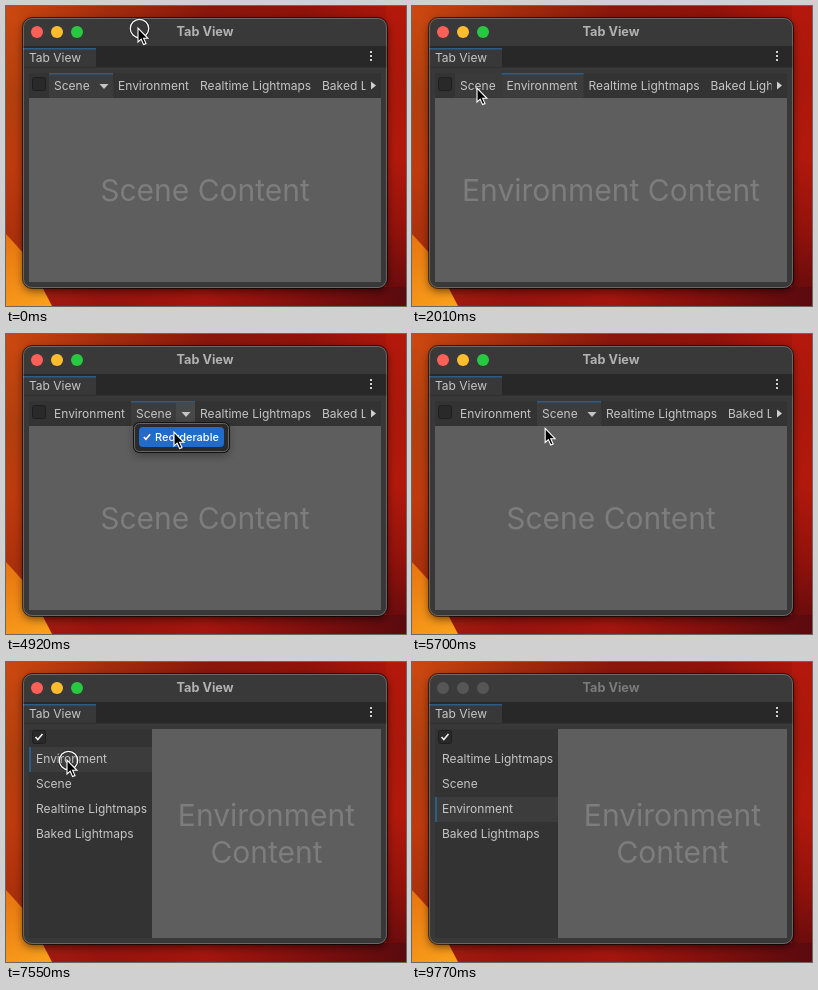
Animation, 400 px wide and 300 px high, one loop 9.79 s. Source, as an HTML page with a canvas:

```html
<!DOCTYPE html>
<html lang="en">
<head>
<meta charset="utf-8">
<title>Tab View</title>
<style>
html, body { margin: 0; width: 100%; height: 100%; overflow: hidden; background: #8b150b; }
canvas { display: block; width: 400px; height: 300px; }
</style>
</head>
<body>
<canvas id="stage" width="400" height="300"></canvas>
<script>
const g = document.getElementById('stage').getContext('2d');
const LOOP = 9790, STEP = 87.7;
const FONT = 'Inter, Roboto, sans-serif';
const BLUE = '#2c5d87', TEXT = '#c6c6c6', PANEL = '#333333', ACTIVE = '#3c3c3c';

const tabs = {
  S: { label: 'Scene', w: 46.5 },
  E: { label: 'Environment', w: 82 },
  R: { label: 'Realtime Lightmaps', w: 122 },
  B: { label: 'Baked Lightmaps', w: 106 }
};

// Pointer path: time, x, y
const path = [
  [350, 132, 22], [1050, 120, 81], [1570, 120, 81], [1830, 65, 82],
  [2900, 65, 82], [3245, 114, 83], [3420, 131, 83],
  [3770, 131, 83], [4210, 180, 79], [4740, 180, 79], [4910, 168, 98], [5000, 168, 100],
  [5440, 168, 100], [6210, 37, 79], [6670, 37, 79], [7105, 61, 98],
  [7550, 61, 98], [8240, 62, 150], [8870, 62, 150], [9370, 372, 304]
];

// Times during which the mouse button is held
const presses = [
  [0, 80], [1130, 1310], [2100, 2270], [2810, 3680], [4380, 4560],
  [5180, 5350], [6220, 6400], [7200, 7370], [7550, 8510]
];

const within = (t, a, b) => t >= a && t < b;

function pointerAt(ms) {
  const t = Math.floor((ms + 16) / STEP) * STEP;
  const i = path.findIndex(p => p[0] > t);
  if (i < 1) return path[i ? path.length - 1 : 0].slice(1);
  const [t0, x0, y0] = path[i - 1], [t1, x1, y1] = path[i];
  const u = (t - t0) / (t1 - t0), e = u * u * (3 - 2 * u);
  return [x0 + (x1 - x0) * e, y0 + (y1 - y0) * e];
}

function rect(x, y, w, h, color) {
  g.fillStyle = color;
  g.fillRect(x, y, w, h);
}

function round(x, y, w, h, r, fill, stroke) {
  g.beginPath();
  g.roundRect(x, y, w, h, r);
  if (fill) { g.fillStyle = fill; g.fill(); }
  if (stroke) { g.strokeStyle = stroke; g.lineWidth = 1; g.stroke(); }
}

function text(s, x, y, color = TEXT, size = 12, weight = 400, align = 'left') {
  g.font = `${weight} ${size}px ${FONT}`;
  g.textAlign = align;
  g.fillStyle = color;
  g.fillText(s, x, y);
}

function poly(color, ...pts) {
  g.beginPath();
  for (let i = 0; i < pts.length; i += 2) g.lineTo(pts[i], pts[i + 1]);
  g.closePath();
  g.fillStyle = color;
  g.fill();
}

function dot(x, y, r, color) {
  g.beginPath();
  g.arc(x, y, r, 0, 7);
  g.fillStyle = color;
  g.fill();
}

function tick(x, y, s, color) {
  g.beginPath();
  g.moveTo(x - 3.5 * s, y);
  g.lineTo(x - 1.2 * s, y + 2.6 * s);
  g.lineTo(x + 3.5 * s, y - 3 * s);
  g.strokeStyle = color;
  g.lineWidth = 1.6;
  g.stroke();
}

function gradient(x0, y0, x1, y1, ...colors) {
  const f = g.createLinearGradient(x0, y0, x1, y1);
  colors.forEach((c, i) => f.addColorStop(i / (colors.length - 1), c));
  return f;
}

function wallpaper() {
  rect(0, 0, 400, 300, gradient(0, 0, 400, 0, '#cc480f', '#a42c0d', '#8a170b', '#8f120a', '#b0170b'));
  rect(0, 12, 17, 288, gradient(0, 12, 0, 240, '#c8470f', '#b23f0e', '#bd3a0d', '#a92f0d'));
  rect(380, 0, 20, 300, gradient(0, 0, 0, 300, '#b3180b', '#ab180b', '#b2190c', '#92120b', '#5f0a0d'));
  rect(0, 281, 400, 19, gradient(0, 0, 400, 0, '#a8200e', '#96130e', '#a3150d', '#800f0d', '#5a0a0e'));
  poly(gradient(0, 230, 40, 300, '#e8740f', '#f9a01c'), 0, 228, 20, 250, 46, 300, 0, 300);
}

function windowFrame(focused) {
  g.save();
  g.shadowColor = 'rgba(0,0,0,.55)';
  g.shadowBlur = 9;
  g.shadowOffsetY = 3;
  round(17, 12, 364, 270, 9, '#383838');
  g.restore();
  g.save();
  round(17, 12, 364, 270, 9);
  g.clip();
  rect(17, 12, 364, 28, focused ? '#393939' : '#3b3b3b');
  rect(17, 40, 364, 22, '#282828');
  rect(17, 42, 73, 20, '#383838');
  rect(17, 42, 73, 1.5, BLUE);
  rect(17, 62, 364, 220, '#383838');
  rect(17, 61, 364, 1, '#303030');
  g.restore();
  round(16.5, 11.5, 365, 271, 9.5, null, 'rgba(0,0,0,.6)');
  round(17.5, 12.5, 363, 269, 8.5, null, 'rgba(255,255,255,.24)');
  ['#ff5f57', '#febc2e', '#28c840'].forEach((c, i) => dot(31 + 20 * i, 26, 6, focused ? c : '#565656'));
  text('Tab View', 199, 30, focused ? '#b2b2b2' : '#7b7b7b', 12.7, 700, 'center');
  text('Tab View', 23, 56);
  [46, 50, 54].forEach(y => rect(364, y - 1, 2, 2, '#d0d0d0'));
  rect(23, 67, 352, 209, PANEL);
}

function checkbox(y, checked) {
  round(26.5, y + .5, 13, 13, 2, '#292929', '#1e1e1e');
  if (checked) tick(33, y + 7, 1, '#eeeeee');
}

function dropArrow(x, y) {
  poly('#c4c4c4', x - 4.5, y - 2, x + 4.5, y - 2, x, y + 3);
}

function drawScene(ms) {
  const [cx, cy] = pointerAt(ms);
  const order = ms < 3420 ? 'SERB' : ms < 8340 ? 'ESRB' : 'RSEB';
  const active = within(ms, 1220, 2180) || ms >= 7290 ? 'E' : 'S';
  const vertical = ms >= 6310;
  const menuOpen = within(ms, 4470, 5350);
  const dragging = within(ms, 2900, 3590) || within(ms, 7550, 8510);
  const focused = ms < 9770;

  wallpaper();
  windowFrame(focused);
  checkbox(vertical ? 68 : 71, vertical);

  const drawTab = (id, x, y, w, h) => {
    const on = id === active;
    const over = !menuOpen && !dragging && focused && cx >= x && cx < x + w && cy >= y && cy < y + h;
    if (on || over) rect(x, y, w, h, on ? ACTIVE : '#3a3a3a');
    if (on) rect(x, y, vertical ? 2 : w, vertical ? h : 1.5, BLUE);
    text(tabs[id].label, x + (vertical ? 7 : 5), y + (vertical ? 16 : 17));
    if (id === 'S' && on) {
      const ax = vertical ? 137 : x + 55;
      if (!vertical && (menuOpen || over && cx > x + 45)) rect(x + 45, y + 1.5, w - 45, h - 1.5, '#484848');
      dropArrow(ax, y + (vertical ? 12 : 13));
    }
  };

  g.save();
  g.beginPath();
  if (vertical) g.rect(23, 85, 123, 191);
  else g.rect(43, 67, 316.5, 25);
  g.clip();
  let pos = vertical ? 85 : 43, dragged;
  for (const id of order) {
    const w = vertical ? 123 : id === 'S' && active === 'S' ? 64 : tabs[id].w;
    if (dragging && id === active) dragged = w;
    else if (vertical) drawTab(id, 23, pos, w, 25);
    else drawTab(id, pos, 67, w, 25);
    pos += vertical ? 25 : w;
  }
  if (dragged) {
    if (vertical) drawTab(active, 23, 85 + Math.max(0, cy - 98), dragged, 25);
    else drawTab(active, 43 + Math.max(0, cx - 70), 67, dragged, 25);
  }
  g.restore();

  const name = tabs[active].label, faint = '#7d7d7d';
  if (vertical) {
    rect(146, 67, 229, 209, '#5e5e5e');
    text(name, 260.5, 164, faint, 30, 400, 'center');
    text('Content', 260.5, 200.5, faint, 30, 400, 'center');
  } else {
    rect(23, 92, 352, 184, '#5e5e5e');
    text(name + ' Content', 199, 195, faint, 30, 400, 'center');
    poly('#d0d0d0', 365, 75.5, 370, 79.5, 365, 83.5);
  }

  if (menuOpen) menu(cy > 93 && !within(ms, 5260, 5350));
  if (presses.some(([a, b]) => within(ms, a, b))) clickRing(cx + 1.5, cy + .5);
  if (focused) arrow(cx, cy);
}

function menu(lit) {
  g.save();
  g.shadowColor = 'rgba(0,0,0,.3)';
  g.shadowBlur = 8;
  g.shadowOffsetY = 3;
  round(127.5, 88, 96, 31, 6, '#2a2a2a');
  g.restore();
  round(127.5, 88.5, 96, 30, 6, null, '#141414');
  round(128.5, 89.5, 94, 28, 5, null, '#666666');
  if (lit) round(133, 93, 85, 20, 4, '#216bcb');
  tick(141, 103, .9, '#ffffff');
  text('Reorderable', 149, 107, '#ffffff', 11, 500);
}

function clickRing(x, y) {
  g.beginPath();
  g.arc(x, y, 9.2, 0, 7);
  g.strokeStyle = 'rgba(0,0,0,.45)';
  g.lineWidth = 2.6;
  g.stroke();
  g.strokeStyle = '#ffffff';
  g.lineWidth = 1.3;
  g.stroke();
}

function arrow(x, y) {
  g.save();
  g.translate(x, y);
  poly('#000', 0, 0, 0, 14, 3.2, 11.2, 5.6, 16.6, 8, 15.6, 5.6, 10.3, 9.9, 10.3);
  g.strokeStyle = '#fff';
  g.lineWidth = 1.1;
  g.stroke();
  g.restore();
}

const start = performance.now();
function tickFrame() {
  drawScene((performance.now() - start) % LOOP);
  requestAnimationFrame(tickFrame);
}
tickFrame();
</script>
</body>
</html>
```
